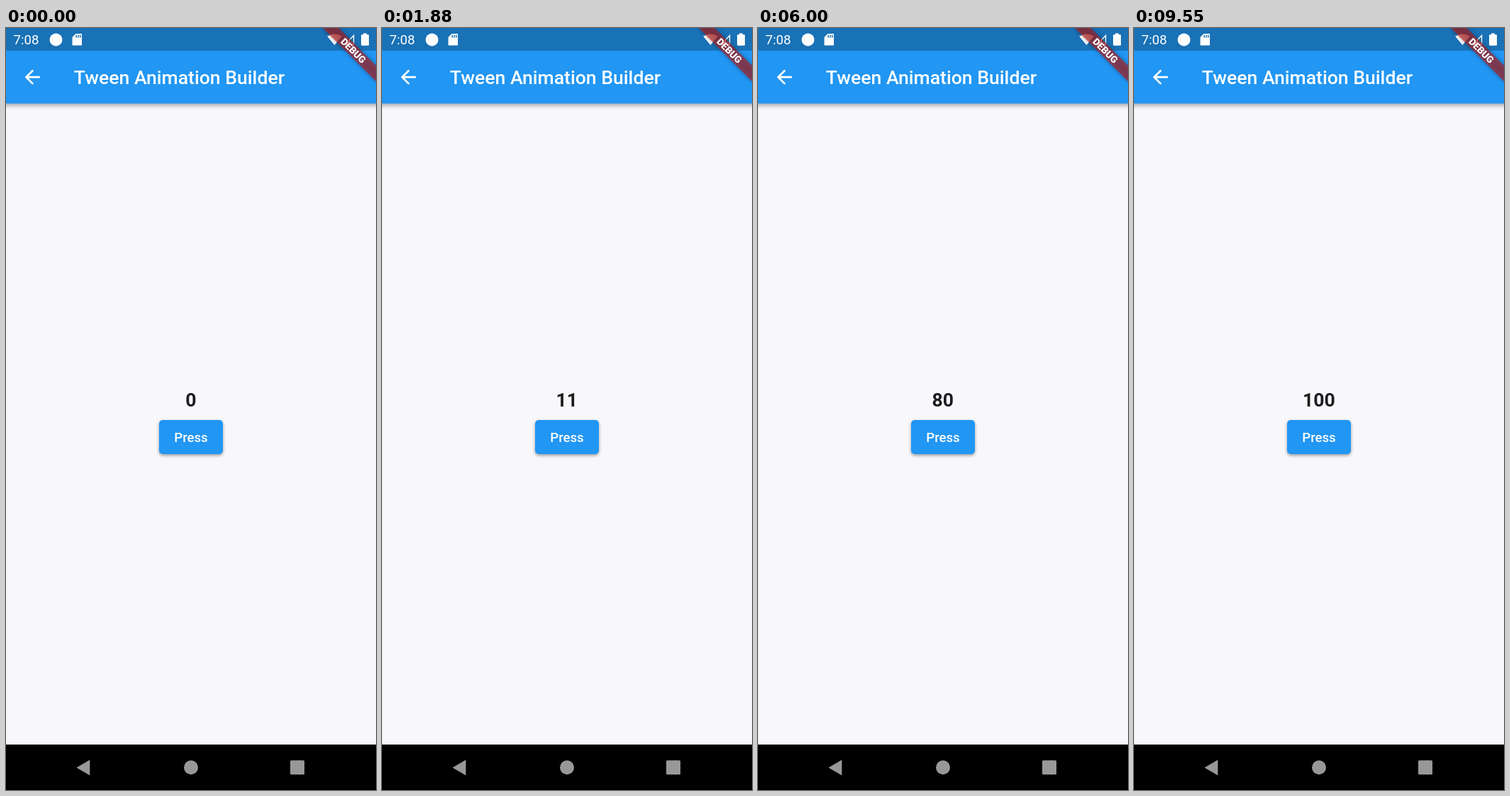
Recreate the animation shown at these times as an HTML page with a canvas. Size 522x1073 px, loop 9600 ms.

```html
<!DOCTYPE html>
<html lang="en">
<head>
<meta charset="utf-8">
<title>Tween Animation Builder</title>
<style>
  html, body { margin: 0; width: 100%; height: 100%; overflow: hidden; background: #f8f8fb; }
  canvas { display: block; width: 522px; height: 1073px; }
</style>
</head>
<body>
<canvas id="stage"></canvas>
<script>
const W = 522, H = 1073, LOOP = 9600;
const DP = W / 392.73;
const BLUE = '#2196f3';
const BUTTON = { x: 216, y: 552, w: 90, h: 48, r: 5 };
const TAPS = [
  { down: 1065, up: 1165, x: 285, y: 580 },
  { down: 8150, up: 8250, x: 285, y: 580 }
];
const COUNT = { start: 1165, duration: 6000, end: 100 };

const canvas = document.getElementById('stage');
const ctx = canvas.getContext('2d');
const ratio = window.devicePixelRatio || 1;
canvas.width = W * ratio;
canvas.height = H * ratio;

const clamp = v => Math.max(0, Math.min(1, v));
const mix = (a, b, k) => a + (b - a) * k;

// CSS-style cubic-bezier, solved by bisection.
function bezier(x1, y1, x2, y2) {
  const at = (a, b, s) => 3 * a * s * (1 - s) ** 2 + 3 * b * s * s * (1 - s) + s ** 3;
  return x => {
    let lo = 0, hi = 1;
    for (let i = 0; i < 24; i++) {
      const mid = (lo + hi) / 2;
      if (at(x1, x2, mid) < x) lo = mid; else hi = mid;
    }
    return at(y1, y2, lo);
  };
}
const ease = bezier(0.25, 0.1, 0.25, 1);
const fastOutSlowIn = bezier(0.4, 0, 0.2, 1);

function rect(x, y, w, h, color) {
  ctx.fillStyle = color;
  ctx.fillRect(x, y, w, h);
}

function circle(x, y, r, color) {
  ctx.fillStyle = color;
  ctx.beginPath();
  ctx.arc(x, y, r, 0, Math.PI * 2);
  ctx.fill();
}

function poly(points, color) {
  ctx.fillStyle = color;
  ctx.beginPath();
  points.forEach(([x, y]) => ctx.lineTo(x, y));
  ctx.closePath();
  ctx.fill();
}

function roundPath(x, y, w, h, r) {
  ctx.beginPath();
  ctx.moveTo(x + r, y);
  ctx.arcTo(x + w, y, x + w, y + h, r);
  ctx.arcTo(x + w, y + h, x, y + h, r);
  ctx.arcTo(x, y + h, x, y, r);
  ctx.arcTo(x, y, x + w, y, r);
  ctx.closePath();
}

function text(str, x, y, size, weight, color, align = 'left') {
  ctx.font = `${weight} ${size}px Roboto, sans-serif`;
  ctx.textAlign = align;
  ctx.fillStyle = color;
  ctx.fillText(str, x, y);
}

function shadow(blur, dy, alpha) {
  ctx.shadowColor = `rgba(0,0,0,${alpha})`;
  ctx.shadowBlur = blur * ratio;
  ctx.shadowOffsetY = dy * ratio;
}

function drawStatusIcons() {
  circle(70.5, 16.5, 9, '#fff');

  // Memory card
  poly([[98.5, 8], [107, 8], [107, 24.5], [93.5, 24.5], [93.5, 13]], '#fff');
  for (let i = 0; i < 3; i++) rect(98.5 + i * 2.8, 10, 1.5, 3.6, '#1971b6');

  // Wi-Fi
  ctx.fillStyle = '#fff';
  ctx.beginPath();
  ctx.moveTo(463.5, 24);
  ctx.lineTo(453.2, 11.8);
  ctx.quadraticCurveTo(463.5, 4.8, 473.8, 11.8);
  ctx.closePath();
  ctx.fill();

  // Mobile signal
  poly([[476.5, 24], [485, 15.5], [485, 24]], '#fff');
  ctx.strokeStyle = '#fff';
  ctx.lineWidth = 1.4;
  ctx.beginPath();
  ctx.moveTo(478.5, 23.3);
  ctx.lineTo(490.5, 10.5);
  ctx.lineTo(490.5, 23.3);
  ctx.closePath();
  ctx.stroke();

  // Battery
  rect(504, 7.5, 5, 3, '#fff');
  roundPath(501, 9.2, 11, 15.6, 1.2);
  ctx.fill();
}

function drawAppBar() {
  ctx.save();
  shadow(7, 3, 0.4);
  rect(-10, 0, W + 20, 106.3, BLUE);
  ctx.restore();
  rect(0, 0, W, 31.8, '#1971b6');
  text('7:08', 10.5, 23, 14 * DP, 400, '#fff');
  drawStatusIcons();

  ctx.save();
  ctx.translate(37.2 - 12 * DP, 69.2 - 12 * DP);
  ctx.scale(DP, DP);
  poly([[20, 11], [7.83, 11], [13.42, 5.41], [12, 4], [4, 12], [12, 20],
        [13.41, 18.59], [7.83, 13], [20, 13]], '#fff');
  ctx.restore();
  text('Tween Animation Builder', 95.7, 79.3, 20 * DP, 500, '#fff');
}

function drawBanner() {
  ctx.save();
  ctx.translate(W, 0);
  ctx.rotate(Math.PI / 4);
  ctx.scale(DP, DP);
  ctx.save();
  shadow(6, 0, 0.5);
  rect(-40, 28, 80, 12, 'rgba(183,28,28,0.627)');
  ctx.restore();
  text('DEBUG', 0, 37.6, 10.2, 900, '#fff', 'center');
  ctx.restore();
}

function drawNavBar() {
  const gray = '#989898';
  rect(0, 1009, W, H - 1009, '#000');
  poly([[99.5, 1041.5], [118.3, 1030.5], [118.3, 1052.5]], gray);
  circle(261, 1041.3, 10, gray);
  roundPath(401, 1031.3, 20, 20, 1.5);
  ctx.fill();
}

// How far the button is raised: 0 at rest, 1 when held.
function lift(t) {
  return TAPS.reduce((most, tap) => {
    const rise = clamp((Math.min(t, tap.up) - tap.down) / 200);
    const k = clamp(rise - Math.max(0, t - tap.up) / 200);
    return Math.max(most, fastOutSlowIn(k));
  }, 0);
}

function drawRipple(tap, t) {
  const { x, y, w, h } = BUTTON;
  const held = t - tap.down, released = t - tap.up;
  if (held < 0 || released > 375) return;
  const progress = released < 0
    ? held / 1000
    : (tap.up - tap.down) / 1000 + released / 225;
  const k = ease(clamp(progress));
  const reach = Math.hypot(w, h) / 2;
  const alpha = 0.24 * clamp(held / 75) * (1 - clamp((released - 225) / 150));
  circle(mix(tap.x, x + w / 2, k), mix(tap.y, y + h / 2, k),
    mix(0.3 * reach, reach + 5 * DP, k), `rgba(255,255,255,${alpha})`);
}

function drawButton(t) {
  const { x, y, w, h, r } = BUTTON;
  const up = lift(t);
  ctx.save();
  shadow(mix(4, 9, up), mix(2, 4, up), 0.38);
  roundPath(x, y, w, h, r);
  ctx.fillStyle = BLUE;
  ctx.fill();
  ctx.restore();

  ctx.save();
  roundPath(x, y, w, h, r);
  ctx.clip();
  TAPS.forEach(tap => drawRipple(tap, t));
  ctx.restore();
  text('Press', x + w / 2, 582.5, 14 * DP, 500, '#fff', 'center');
}

function draw(t) {
  ctx.setTransform(ratio, 0, 0, ratio, 0, 0);
  rect(0, 0, W, H, '#f8f8fb');
  drawAppBar();
  const count = Math.floor(COUNT.end * clamp((t - COUNT.start) / COUNT.duration));
  text(String(count), 260.8, 533.2, 20 * DP, 700, '#1d1d20', 'center');
  drawButton(t);
  drawNavBar();
  drawBanner();
}

const began = performance.now();
function tick() {
  draw((performance.now() - began) % LOOP);
  requestAnimationFrame(tick);
}
tick();
</script>
</body>
</html>
```
